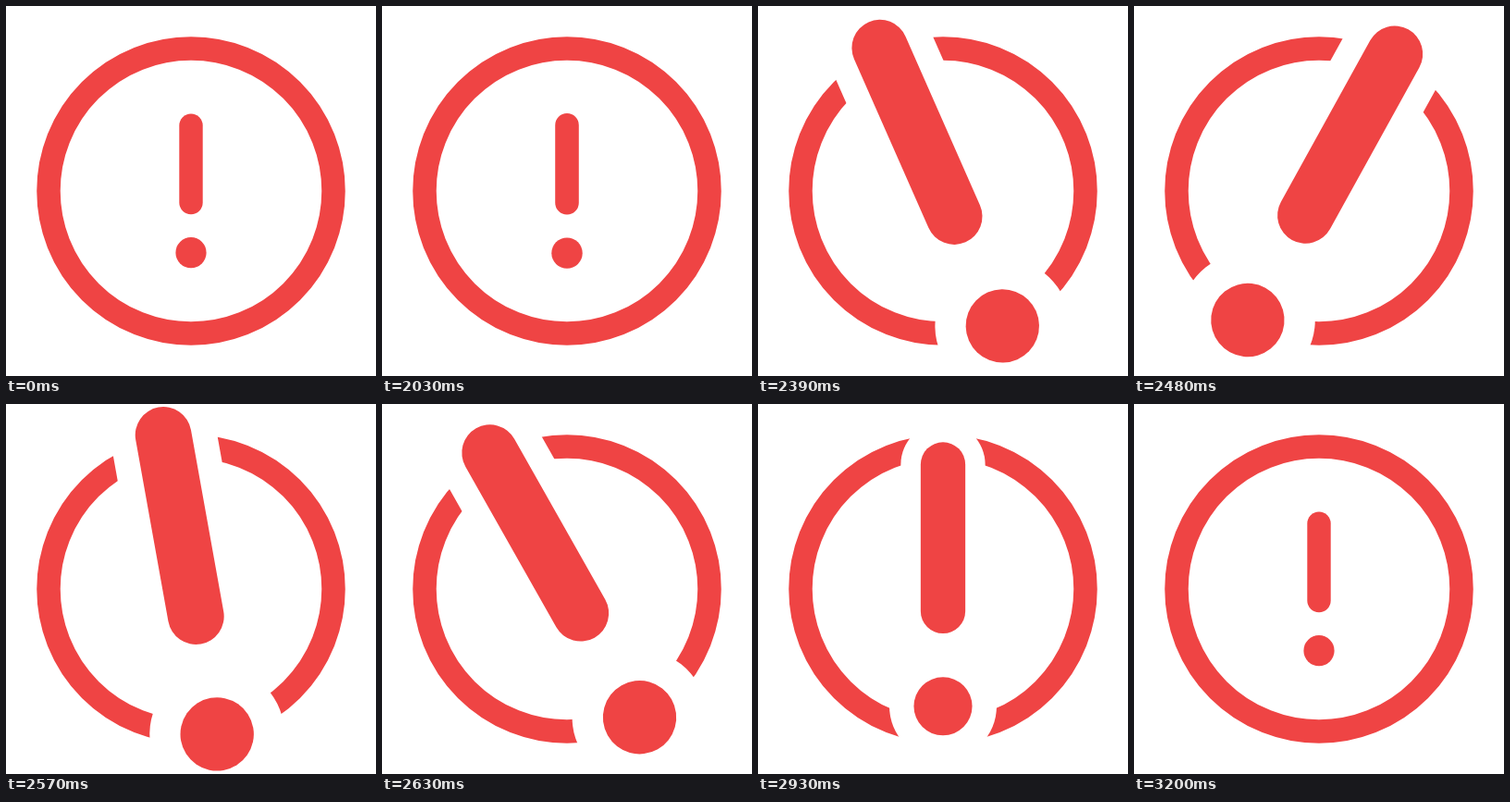
These frames come from a looping animation (400 by 400 pixels, 3230 ms). An HTML page with a canvas:

```html
<!DOCTYPE html>
<html lang="en">
<head>
<meta charset="utf-8">
<title>Alert</title>
<style>
  html, body { margin: 0; width: 100%; height: 100%; overflow: hidden; background: #fff; }
  canvas { display: block; width: 100vw; height: 100vh; }
</style>
</head>
<body>
<canvas id="stage" width="400" height="400"></canvas>
<script>
const ctx = document.getElementById('stage').getContext('2d');
const RED = '#ef4444';
const WHITE = '#fff';
const LOOP = 3230, HOLD = 2030, STEP = 30;

// Keyframes: [step, value], eased in and out between neighbours
const SCALE = [[0.63, 1], [9.73, 2.39], [25, 2.39], [40, 1]];
const ANGLE = [[8, 0], [12.17, -30], [16.33, 30], [20.67, -30], [25, 0]];

function valueAt(keys, step) {
  if (step <= keys[0][0]) return keys[0][1];
  for (let i = 1; i < keys.length; i++) {
    const [start, from] = keys[i - 1];
    const [end, to] = keys[i];
    if (step < end) {
      const p = (step - start) / (end - start);
      return from + (to - from) * p * p * (3 - 2 * p);
    }
  }
  return keys[keys.length - 1][1];
}

function drawRing() {
  ctx.strokeStyle = RED;
  ctx.lineWidth = 25.5;
  ctx.beginPath();
  ctx.arc(0, 0, 154, 0, Math.PI * 2);
  ctx.stroke();
}

function drawMark(color, barRadius, dotRadius) {
  ctx.strokeStyle = ctx.fillStyle = color;
  ctx.lineCap = 'round';
  ctx.lineWidth = barRadius * 2;
  ctx.beginPath();
  ctx.moveTo(0, -70.8);
  ctx.lineTo(0, 12.6);
  ctx.stroke();
  ctx.beginPath();
  ctx.arc(0, 66.7, dotRadius, 0, Math.PI * 2);
  ctx.fill();
}

function draw(time) {
  const step = time < HOLD ? 0 : 1 + Math.floor((time - HOLD) / STEP);
  const scale = valueAt(SCALE, step);

  ctx.setTransform(1, 0, 0, 1, 0, 0);
  ctx.fillStyle = WHITE;
  ctx.fillRect(0, 0, 400, 400);
  ctx.translate(200, 200);
  drawRing();

  ctx.rotate(valueAt(ANGLE, step) * Math.PI / 180);
  ctx.scale(scale, scale);
  drawMark(WHITE, 24, 30.5); // clears the ring around the mark
  drawMark(RED, 12.7, 16.6);
}

const begin = performance.now();
function tick() {
  draw((performance.now() - begin) % LOOP);
  requestAnimationFrame(tick);
}
tick();
</script>
</body>
</html>
```
